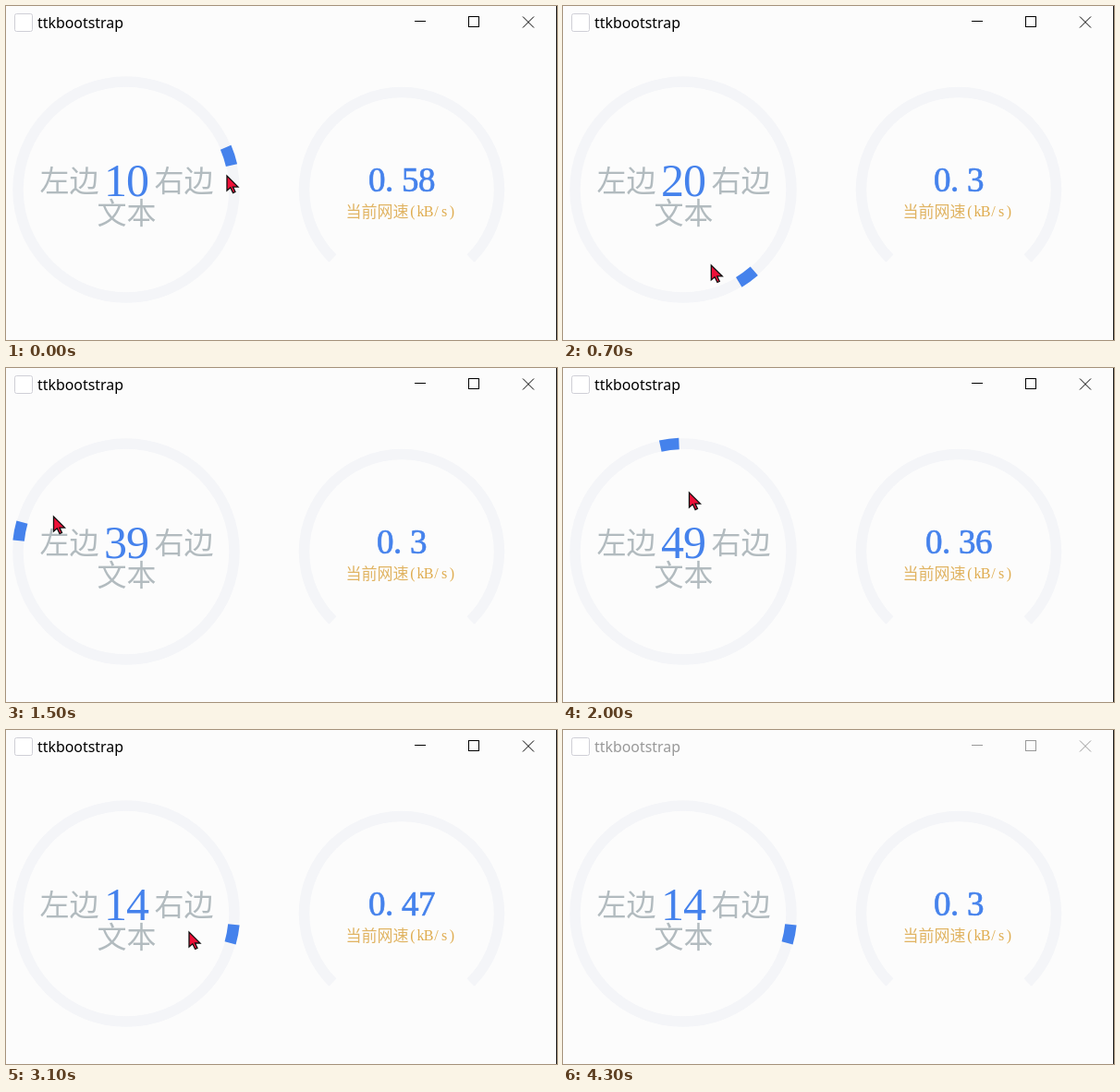
Recreate the animation shown at these times as an HTML page. Size 596x362 px, loop 4400 ms.

```html
<!DOCTYPE html>
<html lang="zh-CN">
<head>
<meta charset="utf-8">
<title>Meters</title>
<style>
  html, body { margin: 0; width: 100%; height: 100%; overflow: hidden; background: #fcfcfc; }
  svg { display: block; width: 596px; height: 362px; }
  .ring { fill: none; stroke: #f4f5f8; stroke-width: 11.5; }
  .cjk { font-family: "Noto Sans CJK SC", "Noto Sans CJK", sans-serif; font-weight: 100; }
  .label { font-size: 32px; fill: #b2bbbf; }
  .num { font-family: "Liberation Serif", serif; fill: #4582ec; }
  .unit { font-size: 17px; fill: #e0b361; }
  .latin { font: 16px "Liberation Serif", serif; fill: #dfac4f; text-anchor: middle; }
  #title { font: 15.9px "Noto Sans", "Open Sans", sans-serif; }
  #bar { --ink: #000; }
  #bar.idle { --ink: #999; }
  #title { fill: var(--ink); }
  #buttons { fill: none; stroke: var(--ink); }
</style>
</head>
<body>
<svg viewBox="0 0 596 362">
  <rect width="596" height="362" fill="#fcfcfc"/>
  <path d="M595.5 0V362" stroke="#1a1a1a"/>

  <g id="bar">
    <rect x="9.5" y="8.5" width="19" height="19" rx="2" fill="#fff" stroke="#cfcfd6"/>
    <text id="title" x="34" y="24">ttkbootstrap</text>
    <g id="buttons">
      <path d="M442 16.5H454"/>
      <rect x="500.5" y="11.5" width="11" height="11"/>
      <path d="M559 11.5L571 23.5M571 11.5L559 23.5"/>
    </g>
  </g>

  <circle class="ring" cx="130" cy="199" r="117"/>
  <path id="wedge" fill="none" stroke="#4582ec" stroke-width="12.5"/>
  <text id="left" class="cjk label" y="201" text-anchor="end">左边</text>
  <text id="value" class="num" y="205.5" font-size="50"></text>
  <text id="right" class="cjk label" y="201">右边</text>
  <text class="cjk label" x="130.5" y="236" text-anchor="middle">文本</text>

  <path id="arc" class="ring"/>
  <text id="speed" class="num" y="200.5" font-size="37" stroke="#4582ec" stroke-width=".7"></text>
  <text class="cjk unit" x="367.5" y="229">当前网速</text>
  <text class="latin" x="440 448.5 457 465.5 474 482.5" y="228">(kB/s)</text>

  <path id="cursor" d="M0 0V16L3.8 12.8L6.6 18.5L9 17.4L6.5 12H12Z"
        fill="#ee1038" stroke="#111" stroke-width="1.3"/>
</svg>
<script>
const LOOP = 4400, STEP = 100;
const CENTER = [130, 199];
const $ = id => document.getElementById(id);

// Each row: step, then the tracked numbers.
const VALUES = [[0, 10], [7, 20], [12, 32], [15, 39], [18, 47], [20, 49], [24, 56], [30, 64]];
const POINTER = [[0, -7.8, 110], [7, 69.7, 87.4], [12, 154, 95], [15, 205.8, 87.2],
                 [20, 275.8, 64.3], [24, 318.6, 62], [30, 376.4, 70.9]];
const SPEEDS = [[0, "0.58"], [5, "0.3"], [17, "0.36"], [29, "0.47"], [41, "0.3"]];
const EXIT = 34, GONE = 39, IDLE = 40;

function track(rows, s) {
  const next = rows.findIndex(row => row[0] > s);
  if (next < 0) return rows.at(-1).slice(1);
  const a = rows[next - 1], b = rows[next];
  const k = (s - a[0]) / (b[0] - a[0]);
  return a.slice(1).map((v, i) => v + (b[i + 1] - v) * k);
}

function polar([cx, cy], r, deg) {
  const a = deg * Math.PI / 180;
  return [cx + r * Math.cos(a), cy + r * Math.sin(a)];
}

function arcPath(center, r, from, to) {
  const large = to - from > 180 ? 1 : 0;
  return `M${polar(center, r, from)}A${r} ${r} 0 ${large} 1 ${polar(center, r, to)}`;
}

// Sets text in equal cells around a centre.
function setCells(el, text, center, cell, nudge) {
  const start = center - text.length * cell / 2 + nudge;
  el.setAttribute("x", [...text].map((_, i) => start + i * cell).join(" "));
  el.textContent = text;
}

function drawMeter(s) {
  const value = Math.round(track(VALUES, s)[0]) % 50;
  const text = String(value), angle = value * 7.2 - 90;
  const gap = text.length * 12 + 6;
  $("wedge").setAttribute("d", arcPath(CENTER, 117, angle - 5, angle + 5));
  setCells($("value"), text, 130.5, 24, -0.5);
  $("left").setAttribute("x", 130.5 - gap);
  $("right").setAttribute("x", 130.5 + gap);
}

function drawPointer(s) {
  const [angle, radius] = track(POINTER, s);
  let [x, y] = polar(CENTER, radius, angle);
  const k = Math.max(0, s - EXIT);
  x += 8 * k;
  y += 6 * k * k;
  $("cursor").setAttribute("transform", `translate(${x} ${y})`);
  $("cursor").setAttribute("visibility", s < GONE ? "visible" : "hidden");
}

function draw(s) {
  drawMeter(s);
  drawPointer(s);
  setCells($("speed"), SPEEDS.findLast(row => row[0] <= s)[1], 428.5, 18, -0.5);
  $("bar").classList.toggle("idle", s >= IDLE);
}

$("arc").setAttribute("d", arcPath([428, 199], 105.5, 135, 405));

const begin = performance.now();
let shown = -1;
function tick() {
  const s = Math.floor((performance.now() - begin) % LOOP / STEP);
  if (s !== shown) draw(shown = s);
  requestAnimationFrame(tick);
}
tick();
</script>
</body>
</html>
```
